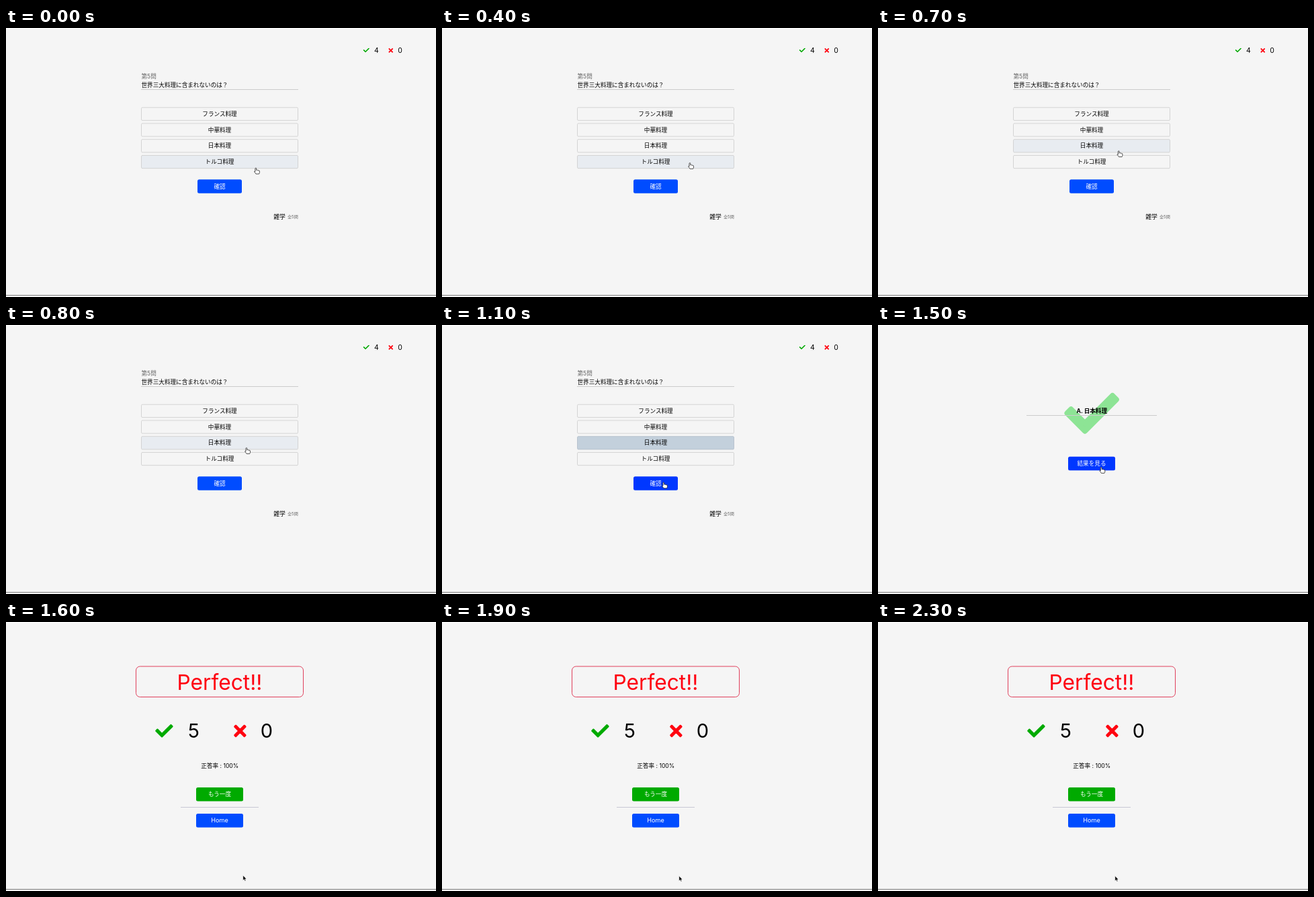
Write an HTML page that moves like this. It is 640 px wide and 400 px high and loops after 2.4 s.

```html
<!DOCTYPE html>
<html lang="ja">
<head>
<meta charset="utf-8">
<title>クイズ</title>
<style>
  html, body { margin: 0; width: 100%; height: 100%; overflow: hidden; background: #f5f5f5; }
  svg { display: block; width: 640px; height: 400px; }
  text { font: 8.6px Inter, "Noto Sans CJK JP", "Noto Sans CJK", sans-serif; fill: #000; }
  .mid text, text.mid { text-anchor: middle; }
  .button rect { fill: #004cff; }
  .button.hover rect { fill: #0037ff; }
  .button text { fill: #fff; }
  .choice rect { fill: #f5f5f5; stroke: #ccc; stroke-width: .8; }
  .choice.hover rect { fill: #e8ecf1; }
  .choice.selected rect { fill: #c3d0dc; stroke: #b0bcc8; }
  .rule { stroke: #ccc; }
  .right { color: #0a0; }
  .wrong { color: #ff0010; }
  .small text { font-size: 10.5px; }
  .large text { font-size: 29px; }
</style>
</head>
<body>
<svg viewBox="0 0 640 400">
  <defs>
    <polygon id="check" points="25.6,255 61.8,218.7 192,348.9 450.2,90.7 486.4,126.9 192,421.3"
      fill="currentColor" stroke="currentColor" stroke-width="51.2" stroke-linejoin="round"/>
    <polygon id="cross" points="53.7,31.4 176,153.7 298.3,31.4 320.6,53.7 198.3,176 320.6,298.3 298.3,320.6 176,198.3 53.7,320.6 31.4,298.3 153.7,176 31.4,53.7"
      fill="currentColor" stroke="currentColor" stroke-width="62.8" stroke-linejoin="round"/>
  </defs>

  <rect width="640" height="400" fill="#f5f5f5"/>
  <rect width="640" height="1.5" fill="#fff"/>
  <rect y="397" width="640" height="1" fill="#777"/>
  <rect y="398" width="640" height="2" fill="#fff"/>

  <g id="question">
    <g class="small mid">
      <use href="#check" class="right" transform="translate(531.5 28.3) scale(.0184)"/>
      <text x="551.5" y="37">4</text>
      <use href="#cross" class="wrong" transform="translate(569.4 30) scale(.019)"/>
      <text x="586.6" y="37">0</text>
    </g>
    <text x="201.5" y="75.2" style="fill:#666">第5問</text>
    <text x="201.5" y="88.2">世界三大料理に含まれないのは？</text>
    <path class="rule" d="M201 91.5H435"/>
    <g id="choices" class="mid"></g>
    <g class="button mid" id="confirm">
      <rect x="285" y="225.3" width="66" height="20.5" rx="2.5"/>
      <text x="318" y="239">確認</text>
    </g>
    <text x="398.3" y="283.8" style="font-size:8.8px">雑学</text>
    <text x="434.8" y="283.4" style="font-size:6.1px;fill:#666;text-anchor:end">全5問</text>
  </g>

  <g id="answer">
    <use href="#check" color="#8de495" transform="translate(277.5 90.7) scale(.1588)"/>
    <path class="rule" d="M221 134.5H415"/>
    <text class="mid" x="318.3" y="131.3" style="font-weight:700">A. 日本料理</text>
    <g class="button mid" id="showResult">
      <rect x="283" y="195.7" width="70" height="20.5" rx="2.5"/>
      <text x="318" y="209.2">結果を見る</text>
    </g>
  </g>

  <g id="result">
    <rect x="193.5" y="66" width="249" height="45.5" rx="6" fill="none" stroke="#e0405c"/>
    <text class="mid" x="318" y="100.5" style="font-size:31.7px;fill:#ff0010">Perfect!!</text>
    <g class="large mid">
      <use href="#check" class="right" transform="translate(222.2 148.7) scale(.0516)"/>
      <text x="279.3" y="172">5</text>
      <use href="#cross" class="wrong" transform="translate(339.2 152.8) scale(.0522)"/>
      <text x="387.8" y="172">0</text>
    </g>
    <text class="mid" x="318.3" y="216.6">正答率 : 100%</text>
    <g class="button mid">
      <rect x="283" y="246" width="70" height="20.5" rx="2.5" style="fill:#0a0"/>
      <text x="318" y="259.3">もう一度</text>
    </g>
    <path class="rule" d="M260 275.5H376" style="stroke:#c8c8d4"/>
    <g class="button mid">
      <rect x="283" y="285" width="70" height="20.5" rx="2.5"/>
      <text x="318" y="298.3" style="font-size:9.1px">Home</text>
    </g>
  </g>

  <g id="cursor">
    <path id="arrow" d="M0 0V7.4L1.7 5.9L2.8 8.5L4.1 7.9L3 5.4H5.2Z" fill="#000" stroke="#fff" stroke-width=".6"/>
    <path id="hand" d="M-.9 .9Q-.9 0 0 0Q.9 0 .9 .9V3.2Q1.8 2.5 2.5 3.4Q3.4 2.8 4.1 3.8Q5.6 3.4 5.6 5V6.6Q5.4 7.6 4.8 8.8H.2Q-.8 7.2 -2.2 5.6Q-2.4 4.4 -.9 5.2Z"
      fill="#fff" stroke="#222" stroke-width=".8" stroke-linejoin="round"/>
  </g>
</svg>
<script>
const LOOP = 2400, STEP = 100;
const SELECT_AT = 900, ANSWER_AT = 1200, RESULT_AT = 1600;
const SELECTED = 2;
const $ = id => document.getElementById(id);

$('choices').innerHTML = ['フランス料理', '中華料理', '日本料理', 'トルコ料理'].map((label, i) => {
  const y = 118.2 + i * 23.75;
  return `<g class="choice"><rect x="201.5" y="${y}" width="233" height="19.2" rx="1.5"/>
    <text x="318" y="${y + 12.7}">${label}</text></g>`;
}).join('');
const choices = [...document.querySelectorAll('.choice')];

// Cursor tip: time, x, y
const path = [
  [0, 371.8, 208.2], [300, 371.8, 208.2], [500, 366, 193], [600, 360, 184.3],
  [700, 358.3, 182.8], [900, 357.5, 182.5], [1000, 342, 213], [1100, 329.8, 234],
  [1200, 330, 233.7], [1300, 330.5, 230], [1400, 331.5, 219], [1500, 332.2, 211.5],
  [1600, 352.8, 376.8], [1700, 352.8, 377.6]
];

function tipAt(t) {
  const next = path.findIndex(key => key[0] > t);
  if (next < 0) return path[path.length - 1].slice(1);
  const [t0, x0, y0] = path[next - 1], [t1, x1, y1] = path[next];
  const k = (t - t0) / (t1 - t0);
  return [x0 + (x1 - x0) * k, y0 + (y1 - y0) * k];
}

function hover(group, x, y) {
  const r = group.querySelector('rect').getBBox();
  const inside = x >= r.x && x <= r.x + r.width && y >= r.y && y <= r.y + r.height;
  group.classList.toggle('hover', inside);
  return inside;
}

const show = (id, visible) => { $(id).style.display = visible ? '' : 'none'; };

function draw() {
  const t = Math.floor(performance.now() % LOOP / STEP) * STEP;
  const scene = t < ANSWER_AT ? 'question' : t < RESULT_AT ? 'answer' : 'result';
  for (const id of ['question', 'answer', 'result']) show(id, id === scene);

  const [x, y] = tipAt(t);
  const targets = { question: [...choices, $('confirm')], answer: [$('showResult')], result: [] }[scene];
  const pointing = targets.map(group => hover(group, x, y)).includes(true);
  choices[SELECTED].classList.toggle('selected', t >= SELECT_AT);

  show('hand', pointing);
  show('arrow', !pointing);
  $('cursor').setAttribute('transform', `translate(${x} ${y})`);
  requestAnimationFrame(draw);
}
draw();
</script>
</body>
</html>
```
